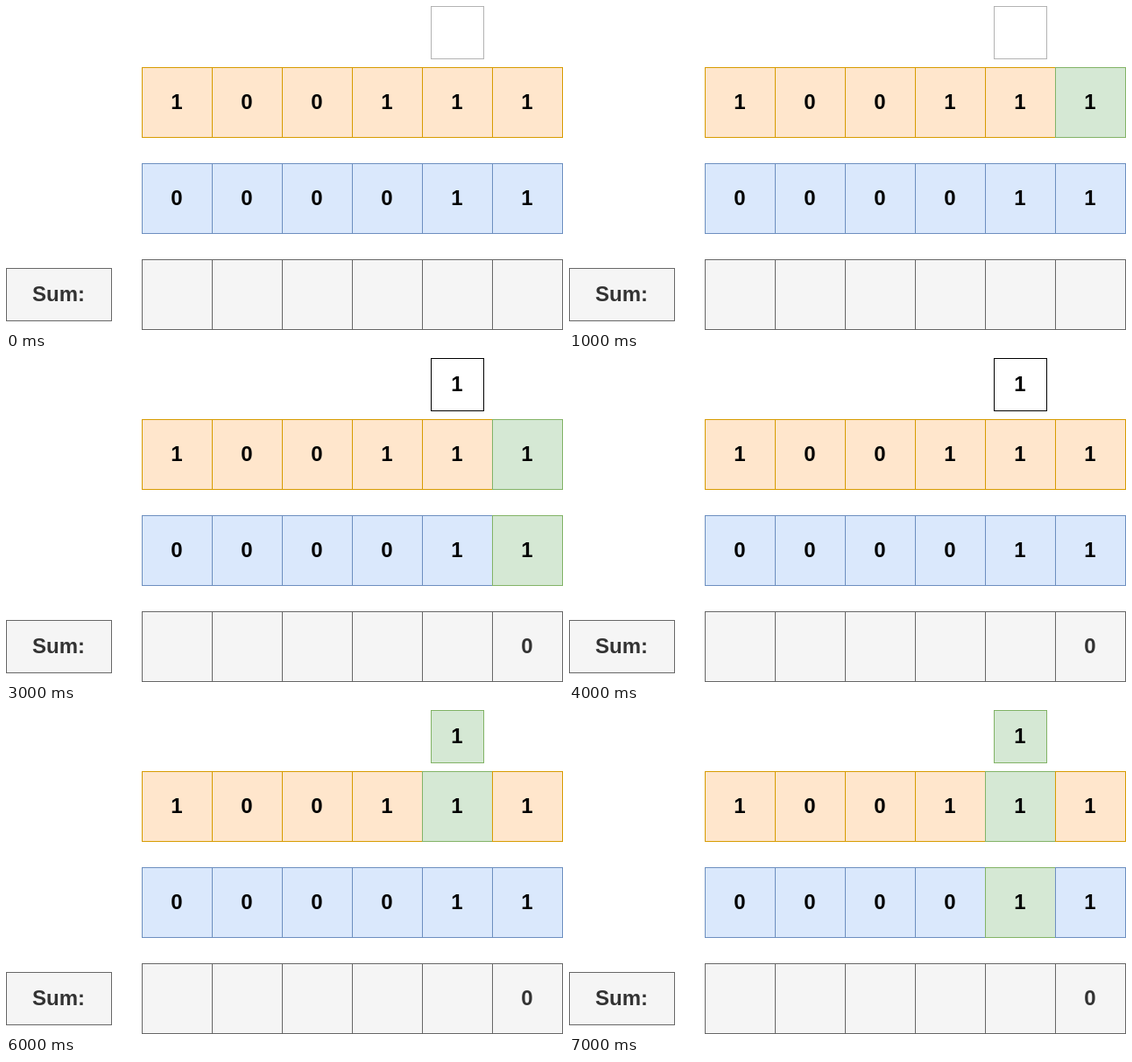
An HTML page with a canvas for the animation above (8 s loop, 636 by 371 pixels).

```html
<!DOCTYPE html>
<html lang="en">
<head>
<meta charset="utf-8">
<title>Binary addition</title>
<style>
  html, body { margin: 0; overflow: hidden; background: #fff; }
  canvas { display: block; }
</style>
</head>
<body>
<canvas id="stage" width="636" height="371"></canvas>
<script>
const ctx = document.getElementById('stage').getContext('2d');
const LOOP = 8000, CELL = 80, LEFT = 155;

// [fill, stroke, text]
const ORANGE = ['#ffe6cc', '#d79b00', '#000'];
const BLUE = ['#dae8fc', '#6c8ebf', '#000'];
const GREEN = ['#d5e8d4', '#82b366', '#000'];
const GREY = ['#f5f5f5', '#666', '#333'];
const WHITE = ['#fff', '#000', '#000'];
const FAINT = ['#fff', '#b3b3b3', '#000'];

function box(x, y, w, h, [fill, stroke, color], label) {
  ctx.fillStyle = fill;
  ctx.strokeStyle = stroke;
  ctx.fillRect(x + 0.5, y + 0.5, w, h);
  ctx.strokeRect(x + 0.5, y + 0.5, w, h);
  ctx.fillStyle = color;
  ctx.fillText(label, x + w / 2, y + h / 2 + 8);
}

function row(y, digits, style, active) {
  [...digits].forEach((digit, i) =>
    box(LEFT + i * CELL, y, CELL, CELL, i === active ? GREEN : style, digit));
}

function draw(time) {
  const step = Math.floor(time % LOOP / 1000);
  const summed = step >= 3;
  // Column being added in each operand, if any
  const top = step >= 6 ? 4 : step >= 1 && step < 4 ? 5 : -1;
  const bottom = step >= 7 ? 4 : step >= 2 && step < 4 ? 5 : -1;

  ctx.clearRect(0, 0, 636, 371);
  ctx.font = 'bold 24px "Liberation Sans", Arial, sans-serif';
  ctx.textAlign = 'center';
  ctx.lineWidth = 1;

  box(485, 0, 60, 60, step >= 5 ? GREEN : summed ? WHITE : FAINT, summed ? '1' : '');
  row(70, '100111', ORANGE, top);
  row(180, '000011', BLUE, bottom);
  row(290, summed ? '     0' : '      ', GREY, -1);
  box(0, 300, 120, 60, GREY, 'Sum:');
}

const start = performance.now();
function tick() {
  draw(performance.now() - start);
  requestAnimationFrame(tick);
}
tick();
</script>
</body>
</html>
```
